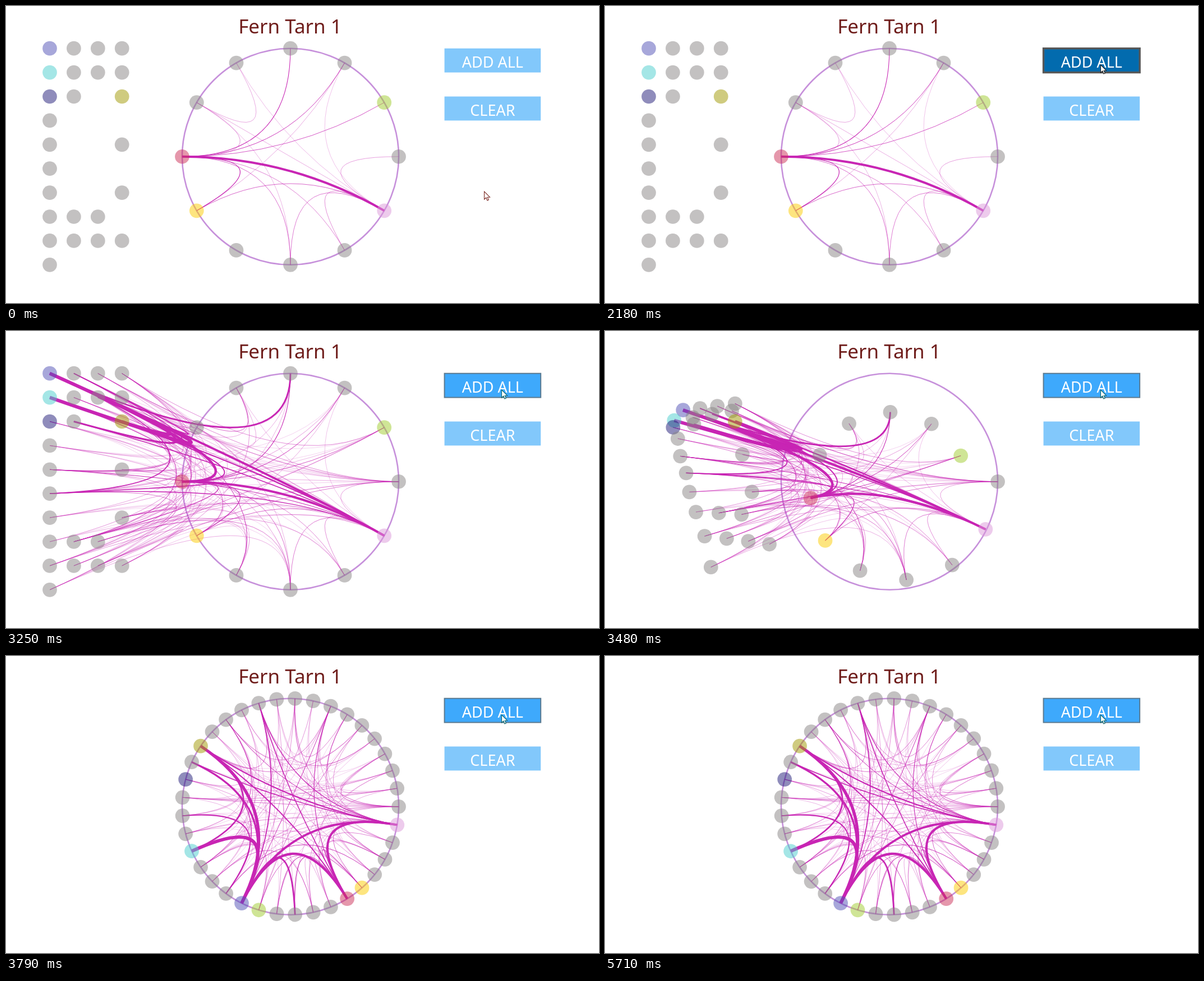
These frames come from a looping animation (1057 px wide and 530 px high, 6250 ms). An HTML page:

```html
<!DOCTYPE html>
<html lang="en">
<head>
<meta charset="utf-8">
<title>Character graph</title>
<style>
  html, body { margin: 0; width: 100%; height: 100%; overflow: hidden; background: #fff; }
  svg { display: block; width: 1057px; height: 530px; }
  text { font-family: "Noto Sans", "Open Sans", sans-serif; text-anchor: middle; }
  .title { font-size: 35px; fill: #6f1d1b; }
  .button text { font-size: 27px; fill: #fff; }
  .button rect { fill: #82c8fb; stroke: none; }
  .button.hover rect { fill: #3ea9fc; stroke: #5c7a90; stroke-width: 2; }
  .button.down rect { fill: #026bae; stroke: #575757; stroke-width: 3.4; }
  #ring { fill: none; stroke: #c791db; stroke-width: 2.6; }
  #links path { fill: none; stroke: #c826b4; }
  #nodes circle { opacity: .5; }
</style>
</head>
<body>
<svg viewBox="0 0 1057 530">
  <text class="title" x="506.5" y="49">Fern Tarn 1</text>
  <circle id="ring"/>
  <g id="links"></g>
  <g id="nodes"></g>
  <g id="buttons"></g>
  <path id="cursor" d="M0 0V14L3.3 11L5.4 16L7.8 15L5.7 10.2H10Z" fill="#fff" stroke-width="1.1"/>
</svg>
<script>
// Everything sits on a grid of unit U starting at X0, Y0
const LOOP = 6250, U = 42.9, X0 = 78, Y0 = 75.7;
const R = 4.5 * U, CX = X0 + 10 * U, CY = Y0 + R;
const RING = 12, TOTAL = 37;
const $ = id => document.getElementById(id);

function set(el, attrs) {
  for (const k in attrs) el.setAttribute(k, attrs[k]);
  return el;
}
const make = (tag, parent, attrs) =>
  parent.appendChild(set(document.createElementNS("http://www.w3.org/2000/svg", tag), attrs));

set($("ring"), { cx: CX, cy: CY, r: R });

// Buttons
const buttons = ["ADD ALL", "CLEAR"].map((label, i) => {
  const top = Y0 + 2 * i * U, x = X0 + 16.4 * U;
  const el = make("g", $("buttons"), {});
  make("rect", el, { x, y: top, width: 4 * U, height: U });
  make("text", el, { x: x + 2 * U, y: top + .8 * U }).textContent = label;
  return { el, top };
});

// Nodes: twelve on the ring, the rest parked in rows on the left
const ringPoint = (i, n) => {
  const a = i * 2 * Math.PI / n;
  return [CX + R * Math.cos(a), CY + R * Math.sin(a)];
};
const rows = ["0123", "0123", "013", "0", "03", "0", "03", "012", "0123", "0"];
const parked = rows.flatMap((cols, row) => [...cols].map(c => [X0 + U * c, Y0 + U * row]));
const colors = {
  1: "#db97d9", 5: "#fbcb00", 6: "#cb3058", 11: "#9fcb2d",
  12: "#4f4fb5", 16: "#49cdcd", 20: "#1f1977", 22: "#9f9700"
};
const nodes = Array.from({ length: TOTAL }, (_, i) => ({
  from: i < RING ? ringPoint(i, RING) : parked[i - RING],
  to: ringPoint(i, TOTAL),
  el: make("circle", $("nodes"), { r: .3 * U, fill: colors[i] || "#878383" })
}));

// Links: a hub's partners get thinner by a constant factor
const links = [], seen = new Set();
const added = make("g", $("links"), {});

function link(a, b, width) {
  const key = Math.min(a, b) * TOTAL + Math.max(a, b);
  if (a === b || seen.has(key)) return;
  seen.add(key);
  const parent = Math.max(a, b) < RING ? $("links") : added;
  links.push({ a: nodes[a], b: nodes[b], el: make("path", parent, { "stroke-width": width }) });
}
const fan = (hub, partners, width, fade = .86) =>
  partners.forEach((b, i) => link(hub, b, width * fade ** i));

fan(6, [1], 4);
fan(6, [5, 9, 10, 11, 3, 2, 7], 1.2);
fan(1, [5, 3, 2, 0, 7, 8, 10], .7);
fan(7, [8, 3], .4);
fan(5, [10], .4);

fan(12, [16, 22, 6, 1, 21, 9], 6);
fan(22, [16, 1, 6], 2.6);
fan(26, [12, 6, 1], 1.8);
fan(13, [18, 21, 4], 1.9, .7);
fan(21, [1, 12], 1.6);
fan(30, [6, 12], 1.1);
fan(24, [1, 16], 1);

let seed = 17;
const random = () => (seed = (seed * 16807) % 2147483647) / 2147483647;
for (let i = RING; i < TOTAL; i++) {
  for (let n = 0; n < 5; n++) {
    link(i, Math.floor(TOTAL * random() ** 1.5), .2 + .5 * random() ** 2);
  }
}

function layout(p) {
  for (const n of nodes) {
    n.x = n.from[0] + (n.to[0] - n.from[0]) * p;
    n.y = n.from[1] + (n.to[1] - n.from[1]) * p;
    set(n.el, { cx: n.x, cy: n.y });
  }
  for (const { a, b, el } of links) {
    set(el, { d: `M${a.x} ${a.y}Q${CX} ${CY} ${b.x} ${b.y}` });
  }
}

// Timeline: motion is sampled in steps of STEP ms
const STEP = 75.5, ADDED_AT = 3180, SPREAD_AT = 3300, SPREAD_MS = 500;
const presses = [[2180, 3100], [4480, 4870], [5330, 5710]];
const stops = [[852.5, 331], [888, 152], [883.5, 105]];
const legs = [{ at: 720, steps: 9, power: 1.3 }, { at: 1410, steps: 5, power: 1 }];

const clamp = v => Math.min(1, Math.max(0, v));
const cubicInOut = u => u < .5 ? 4 * u ** 3 : 1 - 4 * (1 - u) ** 3;

function pointer(t) {
  let [x, y] = stops[0];
  legs.forEach(({ at, steps, power }, i) => {
    const p = clamp((Math.floor((t - at) / STEP) + 1) / steps);
    const e = 1 - (1 - p) ** power;
    x += (stops[i + 1][0] - stops[i][0]) * e;
    y += (stops[i + 1][1] - stops[i][1]) * e;
  });
  return [x, y];
}

function spread(t) {
  const tick = 3100 + Math.floor((t - 3100) / STEP) * STEP;
  return cubicInOut(clamp((tick - SPREAD_AT) / SPREAD_MS));
}

let shown = -1;
function draw(t) {
  const [x, y] = pointer(t);
  const down = presses.some(([a, b]) => t >= a && t < b);
  for (const { el, top } of buttons) {
    const over = y >= top && y <= top + U;
    set(el, { class: "button" + (over ? down ? " down" : " hover" : "") });
  }
  set($("cursor"), {
    transform: `translate(${x} ${y})`,
    stroke: t < 720 ? "#7c2b25" : t < 3100 ? "#1c1c1c" : "#0b6468"
  });
  set(added, { visibility: t < ADDED_AT ? "hidden" : "visible" });

  const p = spread(t);
  if (p !== shown) layout(shown = p);
}

const start = performance.now();
function frame() {
  draw((performance.now() - start) % LOOP);
  requestAnimationFrame(frame);
}
frame();
</script>
</body>
</html>
```
